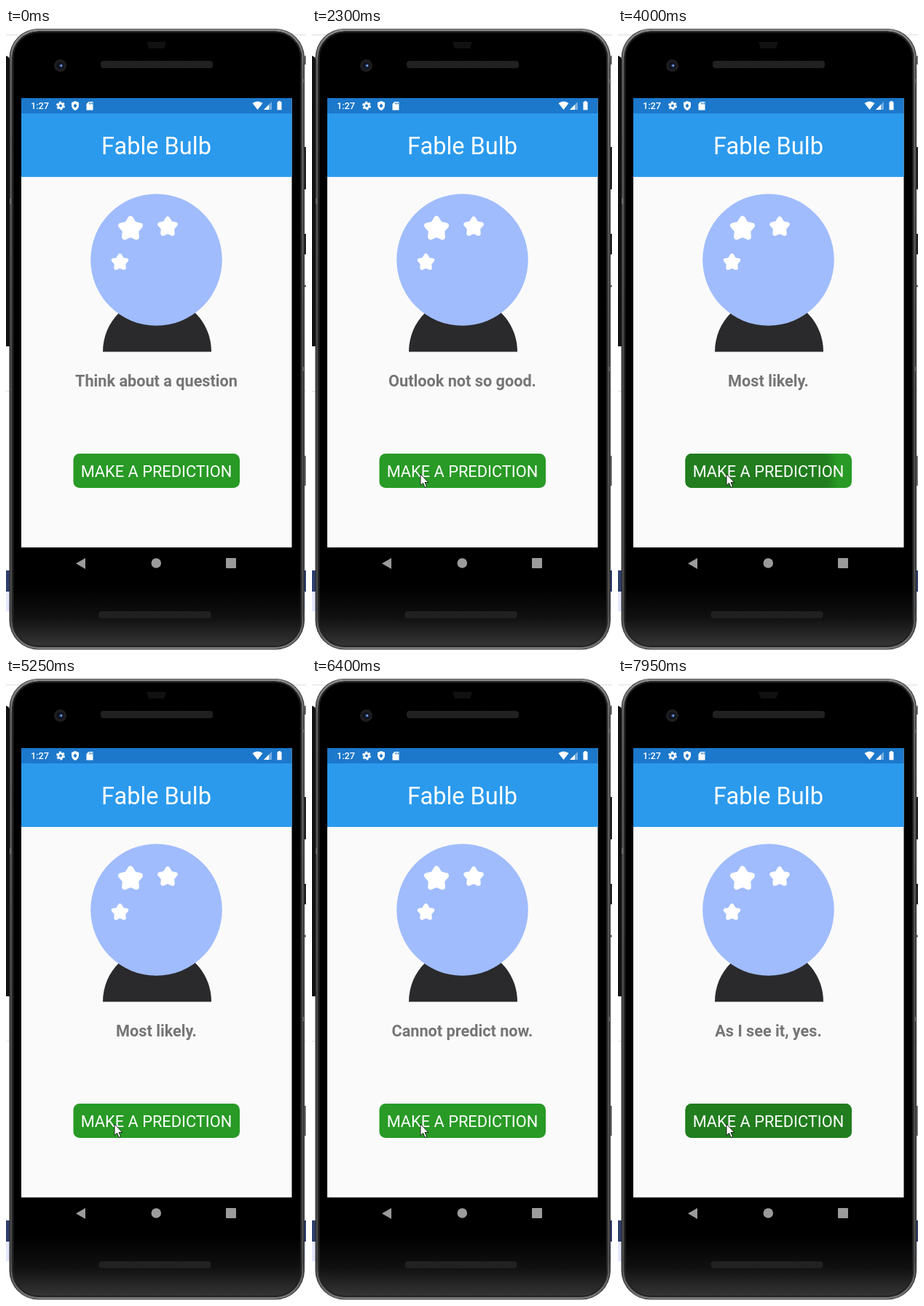
Animation of 412x852 px, one loop 8000 ms. Source, as an HTML page:

```html
<!DOCTYPE html>
<html lang="en">
<head>
<meta charset="utf-8">
<title>Prediction app</title>
<style>
  html, body { margin: 0; width: 100%; height: 100%; overflow: hidden; background: #fff; }
  svg { display: block; width: 100%; height: 100%; }
  text { font-family: Roboto, sans-serif; text-anchor: middle; }
  .answers text { font-size: 21.67px; font-weight: 700; fill: #757575; }
  .tape { animation: answer 8s step-end infinite; }
  .ripples { animation: ripples 8s step-end infinite; }
  .ripples circle { opacity: 0; animation: press 8s linear infinite; animation-delay: calc(var(--at) - 8s); }
  .cursor { animation: enter 8s linear infinite; }

  /* Each answer sits 60px below the previous one. */
  @keyframes answer {
    0% { transform: translateY(0); }
    21.875% { transform: translateY(-60px); }
    48.75% { transform: translateY(-120px); }
    73.125% { transform: translateY(-180px); }
    96.875%, 100% { transform: translateY(-240px); }
  }
  @keyframes ripples {
    0% { visibility: hidden; }
    15%, 100% { visibility: visible; }
  }
  @keyframes press {
    0% { r: 20px; opacity: .4; }
    .6% { opacity: 1; }
    2.5% { r: 152px; }
    3.5% { r: 190px; }
    4.375% { r: 190px; opacity: 1; }
    7.5%, 100% { r: 190px; opacity: 0; }
  }
  @keyframes enter {
    0%, 17.5% { transform: translate(128px, 854px); animation-timing-function: ease-out; }
    20%, 100% { transform: translate(149px, 611px); }
  }
</style>
</head>
<body>
<svg viewBox="0 0 412 852">
  <defs>
    <linearGradient id="body" x2="0" y2="1">
      <stop offset=".9" stop-color="#000"/>
      <stop offset=".95" stop-color="#101010"/>
      <stop offset="1" stop-color="#383838"/>
    </linearGradient>
    <linearGradient id="rim" x2="0" y2="1">
      <stop offset="0" stop-color="#8a8a8a"/>
      <stop offset=".06" stop-color="#606060"/>
      <stop offset=".5" stop-color="#4a4a4a"/>
      <stop offset=".94" stop-color="#4a4a4a"/>
      <stop offset="1" stop-color="#747474"/>
    </linearGradient>
    <pattern id="mesh" width="3" height="3" patternUnits="userSpaceOnUse">
      <path fill="#292929" d="M0 0h3v3h-3z"/>
      <path fill="#181818" d="M0 0h1.5v1.5h-1.5zM1.5 1.5h1.5v1.5h-1.5z"/>
    </pattern>
    <radialGradient id="ink">
      <stop offset=".9" stop-color="#217d1e"/>
      <stop offset="1" stop-color="#217d1e" stop-opacity="0"/>
    </radialGradient>
    <clipPath id="buttonClip"><rect x="92.5" y="583" width="228.500" height="47" rx="8.500"/></clipPath>
    <clipPath id="answerClip"><path d="M22 465h370v40h-370z"/></clipPath>
    <path id="star" stroke-width="5" stroke-linejoin="round"/>
  </defs>

  <g id="surroundings">
    <path fill="#fff" d="M0 0h412v852h-412z"/>
    <path fill="#ddd" d="M0 9h412v1h-412zM0 497h412v1h-412z"/>
    <path fill="#111" d="M0 38q5 1 6 8v390h-6z"/>
    <path fill="#222" d="M410 163h2v58h-2zM410 282h2v28h-2z"/>
    <path fill="#777" d="M410 38h2v12h-2zM410 352h2v3h-2zM410 586h2v41h-2z"/>
    <path fill="#e4e8fa" d="M0 772h412v27h-412z"/>
    <path fill="#2f406f" d="M0 743h412v29h-412z"/>
  </g>

  <g id="phone">
    <rect x="4.500" y="1" width="405.500" height="850.500" rx="40" fill="#222"/>
    <rect x="7" y="3" width="400.500" height="846.500" rx="38" fill="url(#body)" stroke="url(#rim)" stroke-width="3"/>
    <rect x="9.500" y="5.500" width="395.500" height="841.500" rx="35.500" fill="none" stroke="#222" stroke-width="2"/>
    <path stroke="#888" d="M6 233v8M408.500 70v5M408.500 464v6"/>
    <path fill="#111" d="M193 19h27l-3 9h-21z"/>
    <rect x="130" y="45" width="154" height="10" rx="4" fill="url(#mesh)"/>
    <rect x="127.500" y="799" width="154" height="9.500" rx="4" fill="url(#mesh)"/>
    <circle cx="74.500" cy="51.500" r="8.500" fill="#1e1e20"/>
    <circle cx="74.500" cy="51.500" r="5" fill="#10121c"/>
    <circle cx="75.500" cy="51.500" r="2.300" fill="#35538e"/>
    <circle cx="76" cy="51.500" r="1" fill="#a5c0ef"/>
  </g>

  <g id="screen">
    <path fill="#fafafa" d="M21 96h371.500v615.500h-371.500z"/>
    <path fill="#1c78cb" d="M21 96h371.500v21h-371.500z"/>
    <path fill="#2b9aed" d="M21 117h371.500v87h-371.500z"/>
    <text x="206.500" y="173" font-size="32.500" fill="#fff">Fable Bulb</text>
  </g>

  <g id="status" fill="#fff">
    <text x="46.500" y="111" font-size="12.800" font-weight="500">1:27</text>
    <circle cx="75" cy="106.500" r="3.200" fill="none" stroke="#fff" stroke-width="2.600"/>
    <circle cx="75" cy="106.500" r="5" fill="none" stroke="#fff" stroke-width="2" stroke-dasharray="2.800 2.436"/>
    <path d="M95 100l5 2v4q0 4.500-5 7-5-2.500-5-7v-4z"/>
    <path fill="#1c78cb" d="M95 103.500l2.500 3-2.500 3-2.500-3z"/>
    <path d="M113.500 101h6v11.500h-9v-8.500z"/>
    <path stroke="#1c78cb" d="M114.500 102v2.500M116.500 102v2.500M118.500 102v2.500"/>
    <path d="M338.500 103q7-5 14 0l-7 9z"/>
    <path opacity=".4" d="M365 101v11h-11z"/>
    <path d="M361 105v7h-7z"/>
    <path d="M374 100h3v1.300h1.500v11h-6v-11h1.500z"/>
  </g>

  <g id="ball">
    <path fill="#2a2a2c" d="M133 443.500C133 402 166 369 207.500 369S282 402 282 443.500z"/>
    <circle cx="206.500" cy="317.500" r="90.300" fill="#a0bcfd"/>
    <g fill="#fff" stroke="#fff">
      <use href="#star" transform="translate(171 275) scale(1.530)"/>
      <use href="#star" transform="translate(222 272.500) scale(1.250)"/>
      <use href="#star" transform="translate(156.500 321) scale(1.060)"/>
    </g>
  </g>

  <g class="answers" clip-path="url(#answerClip)">
    <g class="tape">
      <text x="206.500" y="490.600">Think about a question</text>
      <text x="206.500" y="550.600">Outlook not so good.</text>
      <text x="206.500" y="610.600">Most likely.</text>
      <text x="206.500" y="670.600">Cannot predict now.</text>
      <text x="206.500" y="730.600">As I see it, yes.</text>
    </g>
  </g>

  <g id="button">
    <g clip-path="url(#buttonClip)">
      <path fill="#289a25" d="M92 582h230v49h-230z"/>
      <g class="ripples" fill="url(#ink)">
        <circle cx="150" cy="612" r="20" style="--at: 1.65s"/>
        <circle cx="150" cy="612" r="20" style="--at: 3.8s"/>
        <circle cx="150" cy="612" r="20" style="--at: 5.75s"/>
        <circle cx="150" cy="612" r="20" style="--at: 7.65s"/>
      </g>
    </g>
    <text x="206.500" y="615.400" font-size="21.800" fill="#fff">MAKE A PREDICTION</text>
  </g>

  <g id="navigation" fill="#9b9b9b">
    <path d="M96 733.500l13-7.500v15z"/>
    <circle cx="206.300" cy="733" r="6.800"/>
    <rect x="302" y="726" width="14" height="14" rx="1"/>
  </g>

  <path class="cursor" fill="#fff" stroke="#111" stroke-width=".9" d="M0 0V15.500l3.500-3.200 2.600 6 2.500-1.100-2.600-5.700h4.800z"/>
</svg>
<script>
  const points = Array.from({ length: 10 }, (_, i) => {
    const radius = i % 2 ? 5 : 9;
    const angle = i * Math.PI / 5;
    return `${radius * Math.sin(angle)} ${-radius * Math.cos(angle)}`;
  });
  document.getElementById('star').setAttribute('d', `M${points.join('L')}Z`);
</script>
</body>
</html>
```
